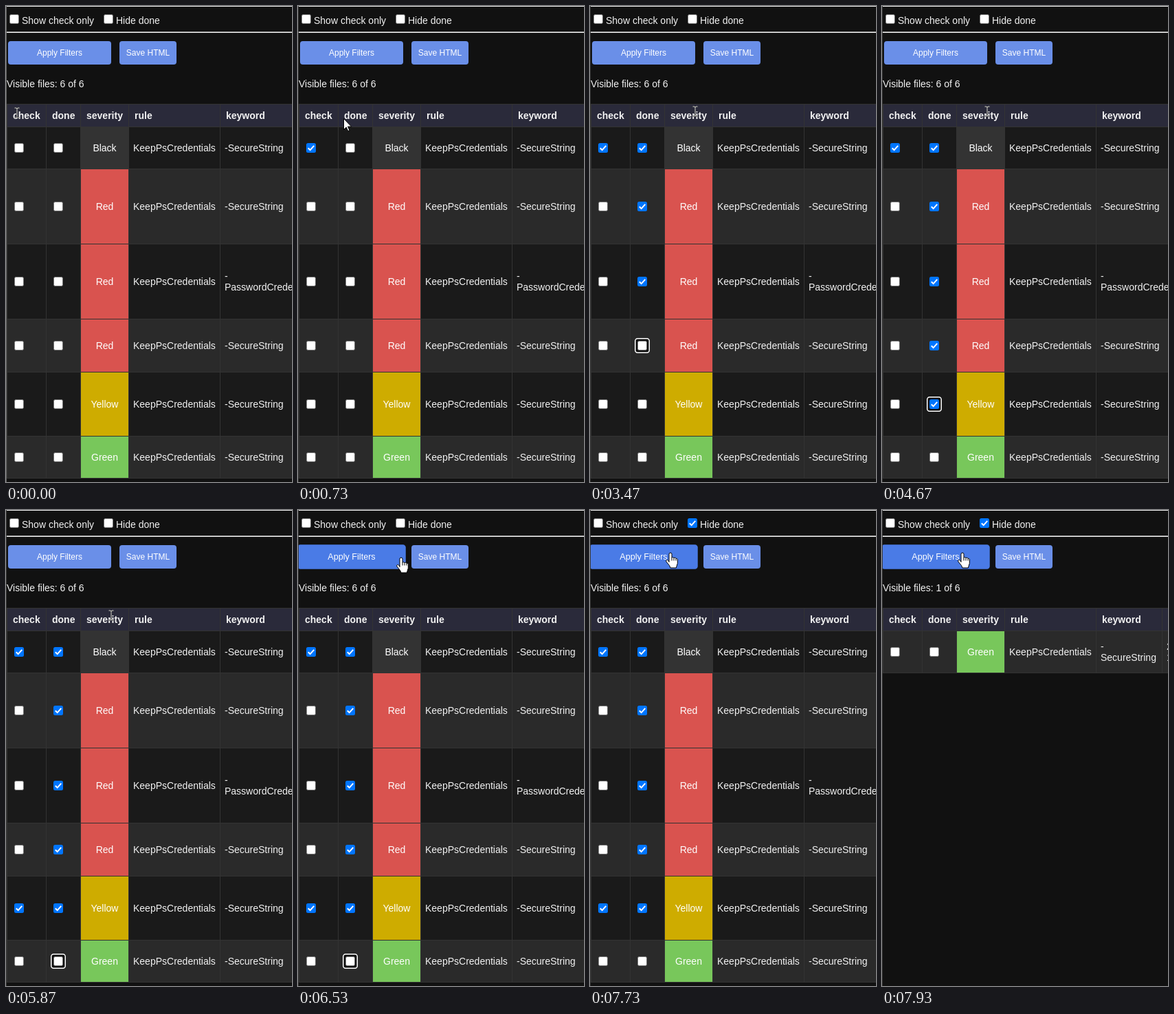
Recreate the animation shown at these times as an HTML page. Size 416 px wide and 691 px high, loop 8000 ms.

```html
<!DOCTYPE html>
<html lang="en">
<head>
<meta charset="utf-8">
<title>File review table</title>
<style>
html, body { margin: 0; width: 100%; height: 100%; overflow: hidden; background: #111; }
svg { display: block; font: 14px Arial, "Liberation Sans", sans-serif; fill: #f2f2f2; }
</style>
</head>
<body>
<svg id="stage" width="416" height="691" viewBox="0 0 416 691"></svg>
<script>
const FPS = 15, FRAMES = 120, NEVER = Infinity;
const FILTER_CLICK = 117, HIDE_DONE = 107;
const stage = document.getElementById('stage');

const colors = { Black: '#333', Red: '#d9534f', Yellow: '#ceac00', Green: '#78c75b' };
const secure = ['-SecureString'];
// checkAt and doneAt are the ticks at which each box gets checked
const rows = [
  { height: 61, severity: 'Black', keyword: secure, checkAt: 8, doneAt: 25 },
  { height: 109, severity: 'Red', keyword: secure, checkAt: NEVER, doneAt: 41 },
  { height: 109, severity: 'Red', keyword: ['-', 'PasswordCredential'], checkAt: NEVER, doneAt: 49 },
  { height: 77, severity: 'Red', keyword: secure, checkAt: NEVER, doneAt: 56 },
  { height: 93, severity: 'Yellow', keyword: secure, checkAt: 78, doneAt: 70 },
  { height: 61, severity: 'Green', keyword: secure, checkAt: NEVER, doneAt: NEVER }
];
const filteredRows = [{ ...rows[5], keyword: ['-', 'SecureString'], extra: ['2', '1'] }];
const headers = [['check', 10, 40], ['done', 67, 34], ['severity', 117, 53], ['rule', 187, 26], ['keyword', 320, 57]];

// Keyboard focus: tick, column, row
const focusSteps = [
  [17, 'done', 0], [34, 'done', 1], [43, 'done', 2], [52, 'done', 3], [58, 'done', 4],
  [73, 'check', 4], [83, 'check', 5], [88, 'done', 5], [105, '', -1]
];
// Pointer: tick, x, y
const pointerPath = [
  [0, 16, 155], [5, 18, 204], [9, 18, 204], [11, 66, 163], [12, 78, 158], [28, 78, 158],
  [31, 153, 152.5], [90, 153, 152.5], [103, 148, 28], [106, 146, 14],
  [108, 146, 14], [116, 117, 62], [119, 117, 62]
];

const rect = (x, y, w, h, fill, more = '') =>
  `<rect x="${x}" y="${y}" width="${w}" height="${h}" fill="${fill}" ${more}/>`;
const text = (x, y, label, more = '') => `<text x="${x}" y="${y}" ${more}>${label}</text>`;
const inside = (p, x, y, w, h) => p.x >= x && p.x < x + w && p.y >= y && p.y < y + h;

function pointerAt(n) {
  const i = Math.max(1, pointerPath.findIndex(k => k[0] >= n));
  const [t0, x0, y0] = pointerPath[i - 1], [t1, x1, y1] = pointerPath[i];
  const u = (n - t0) / (t1 - t0);
  const e = t1 - t0 > 3 ? u * u * (3 - 2 * u) : u;
  return { x: x0 + (x1 - x0) * e, y: y0 + (y1 - y0) * e, kind: 'arrow' };
}

function lines(x, cy, list) {
  const top = cy + 5 - 8 * (list.length - 1);
  return list.map((s, i) => text(x, top + 16 * i, s)).join('');
}

function checkbox(cx, cy, checked, pointer, focused) {
  const x = cx - 7, y = cy - 7;
  const hover = inside(pointer, x, y, 14, 14);
  if (hover) pointer.kind = 'hand';
  const ring = focused
    ? rect(cx - 10.25, cy - 10.25, 20.5, 20.5, '#101010', 'rx="3.5" stroke="#fff" stroke-width="1.5"') : '';
  if (!checked) {
    return ring + rect(x + .5, y + .5, 13, 13, '#fff', `rx="2" stroke="${hover ? '#4f4f4f' : '#767676'}"`);
  }
  return ring + rect(x, y, 14, 14, hover ? '#005cc8' : '#0075ff', 'rx="2.5"') +
    `<path d="M${x + 2.8} ${y + 7.2}l2.9 2.9 5.6-6.2" fill="none" stroke="#fff" stroke-width="2"/>`;
}

function button(x, w, label, pointer) {
  const hover = inside(pointer, x, 51, w, 34);
  if (hover) pointer.kind = 'hand';
  const cx = x + w / 2;
  const grow = hover ? `transform="translate(${cx} 68) scale(1.05) translate(${-cx} -68)"` : '';
  return `<g ${grow}>` + rect(x, 51, w, 34, hover ? '#4a7be6' : '#6a8fe8', 'rx="4"') +
    text(cx, 72, label, 'font-size="12" text-anchor="middle" fill="#fff"') + '</g>';
}

function table(n, pointer) {
  const filtered = n >= FILTER_CLICK;
  const shown = filtered ? filteredRows : rows;
  const focus = focusSteps.filter(f => f[0] <= n).pop() || [];
  let out = rect(1, 142, 415, 34, '#2a2a3a');
  for (const [label, x, w] of headers) {
    out += text(x, 164, label, 'font-weight="bold"');
    if (inside(pointer, x, 151, w, 16)) pointer.kind = 'beam';
  }
  let y = 175, borders = rect(1, 142, 415, 1, '#333') + rect(1, 175, 415, 1, '#333');
  shown.forEach((row, i) => {
    const h = row.height, cy = y + (h + 1) / 2;
    const hover = inside(pointer, 2, y + 1, 414, h);
    const shade = hover ? '#383838' : filtered || i % 2 ? '#2a2a2a' : '#1a1a1a';
    const focused = column => focus[1] === column && focus[2] === i;
    out += rect(1, y + 1, 415, h, shade) +
      rect(109, y + 1, 69, h, colors[row.severity]) +
      checkbox(19, cy, n >= row.checkAt, pointer, focused('check')) +
      checkbox(76, cy, n >= row.doneAt, pointer, focused('done')) +
      text(143.5, cy + 5, row.severity, 'text-anchor="middle" fill="#fff"') +
      text(185, cy + 5, 'KeepPsCredentials') +
      lines(318, cy, row.keyword) + lines(414, cy, row.extra || []);
    y += h;
    borders += rect(1, y, 415, 1, '#333');
  });
  for (const x of [1, 58, 108, 178, 311].concat(filtered ? 407 : [])) {
    borders += rect(x, 142, 1, y - 141, '#333');
  }
  return out + borders;
}

const cursors = {
  arrow: '<path d="M.5 .5V16.5L4.2 13 6.8 18.6 9 17.6 6.5 12.1H11.6Z" fill="#fff" stroke="#000"/>',
  hand: '<path transform="translate(-7 -.5)" d="M5 14V2.6a2 2 0 0 1 4 0V8a1.6 1.6 0 0 1 3 .5 1.6 1.6 0 0 1 3 .7 1.4 1.4 0 0 1 2.3 1.2V16l-2 6.5H7L5.5 19 1 13.6a1.6 1.6 0 0 1 2.6-2Z' +
    'M9 8v4M12 8.7V12M15 9.5V12" fill="#fff" stroke="#000"/>',
  beam: '<path d="M-3.5 -7H-1L0 -6 1 -7H3.5M0 -6V6M-3.5 7H-1L0 6 1 7H3.5" fill="none" stroke="#fff" style="mix-blend-mode:difference"/>'
};

function draw(n) {
  const pointer = pointerAt(n);
  const page = rect(0, 0, 416, 691, '#111') +
    rect(1, 0, 415, 1, '#eee') + rect(1, 37, 415, 1, '#9a9a9a') + rect(1, 38, 415, 1, '#eee') +
    checkbox(12, 19, false, pointer) + text(23, 26, 'Show check only') +
    checkbox(149, 19, n >= HIDE_DONE, pointer) + text(160, 26, 'Hide done') +
    button(3, 150, 'Apply Filters', pointer) + button(165, 83, 'Save HTML', pointer) +
    text(1, 118, `Visible files: ${n >= FILTER_CLICK ? 1 : 6} of 6`) +
    table(n, pointer) +
    rect(0, 0, 1, 691, n < 8 ? '#666' : '#3a3a3a');
  stage.innerHTML = page +
    `<g transform="translate(${Math.round(pointer.x)} ${Math.round(pointer.y)})">${cursors[pointer.kind]}</g>`;
}

let last = -1;
const start = performance.now();
function tick(now) {
  const ms = Math.max(0, now - start) % 8000;
  const n = Math.floor(ms * FPS / 1000 + .1) % FRAMES;
  if (n !== last) draw(last = n);
  requestAnimationFrame(tick);
}
draw(0);
requestAnimationFrame(tick);
</script>
</body>
</html>
```
